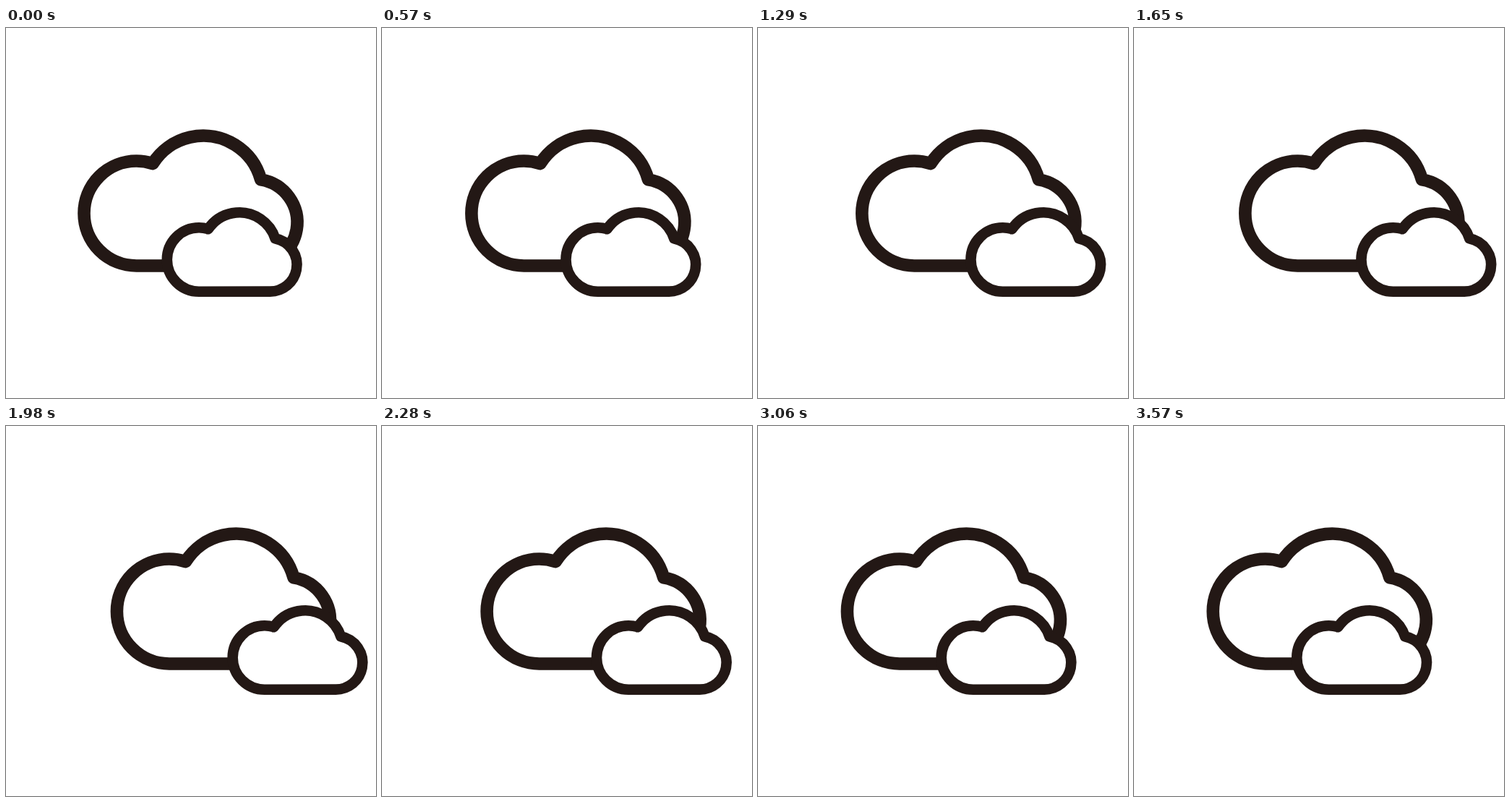
Recreate the animation shown at these times as an HTML page with a canvas. Size 512 by 512 pixels, loop 3600 ms.

```html
<!DOCTYPE html>
<html lang="en">
<head>
<meta charset="utf-8">
<title>Drifting clouds</title>
<style>
  html, body { margin: 0; width: 100%; height: 100%; overflow: hidden; background: #fff; }
  canvas { display: block; width: 512px; height: 512px; }
</style>
</head>
<body>
<canvas id="stage" width="512" height="512"></canvas>
<script>
const ctx = document.getElementById("stage").getContext("2d");
const LOOP = 3600, STEP = 30;

// Each lobe is [x, y, radius]; notches are where neighbouring lobes meet.
const backCloud = {
  line: 17.6,
  lobes: [[180.5, 256.5, 72.5], [273, 231.7, 82.6], [343, 269, 60]],
  notches: [[203, 187.6], [353, 209.8]]
};
const frontCloud = {
  line: 14.6,
  lobes: [[267, 320.5, 44.2], [323, 307.4, 52.1], [365.5, 327.6, 37]],
  notches: [[279.5, 278.1], [372.5, 291.2]]
};

const angleTo = ([cx, cy], [x, y]) => Math.atan2(y - cy, x - cx);

function drawCloud({ line, lobes, notches }, shift) {
  const [left, top, right] = lobes;
  const [a, b] = notches;
  ctx.save();
  ctx.translate(shift, 0);
  ctx.beginPath();
  ctx.arc(...left, Math.PI / 2, angleTo(left, a));
  ctx.arc(...top, angleTo(top, a), angleTo(top, b));
  ctx.arc(...right, angleTo(right, b), Math.PI / 2);
  ctx.closePath();
  ctx.fill();
  ctx.lineWidth = line;
  ctx.stroke();
  ctx.restore();
}

function render(now) {
  const t = Math.floor((now % LOOP) / STEP) * STEP;
  // Steady drift out and back; the return lags by half a step.
  const drift = Math.min(t, 1800, 3615 - t) / 18;
  ctx.clearRect(0, 0, 512, 512);
  ctx.fillStyle = "#fff";
  ctx.strokeStyle = "#231815";
  ctx.lineJoin = "round";
  drawCloud(backCloud, drift / 2);
  drawCloud(frontCloud, drift);
}

let start;
function tick(now) {
  start ??= now;
  render(now - start);
  requestAnimationFrame(tick);
}
render(0);
requestAnimationFrame(tick);
</script>
</body>
</html>
```
